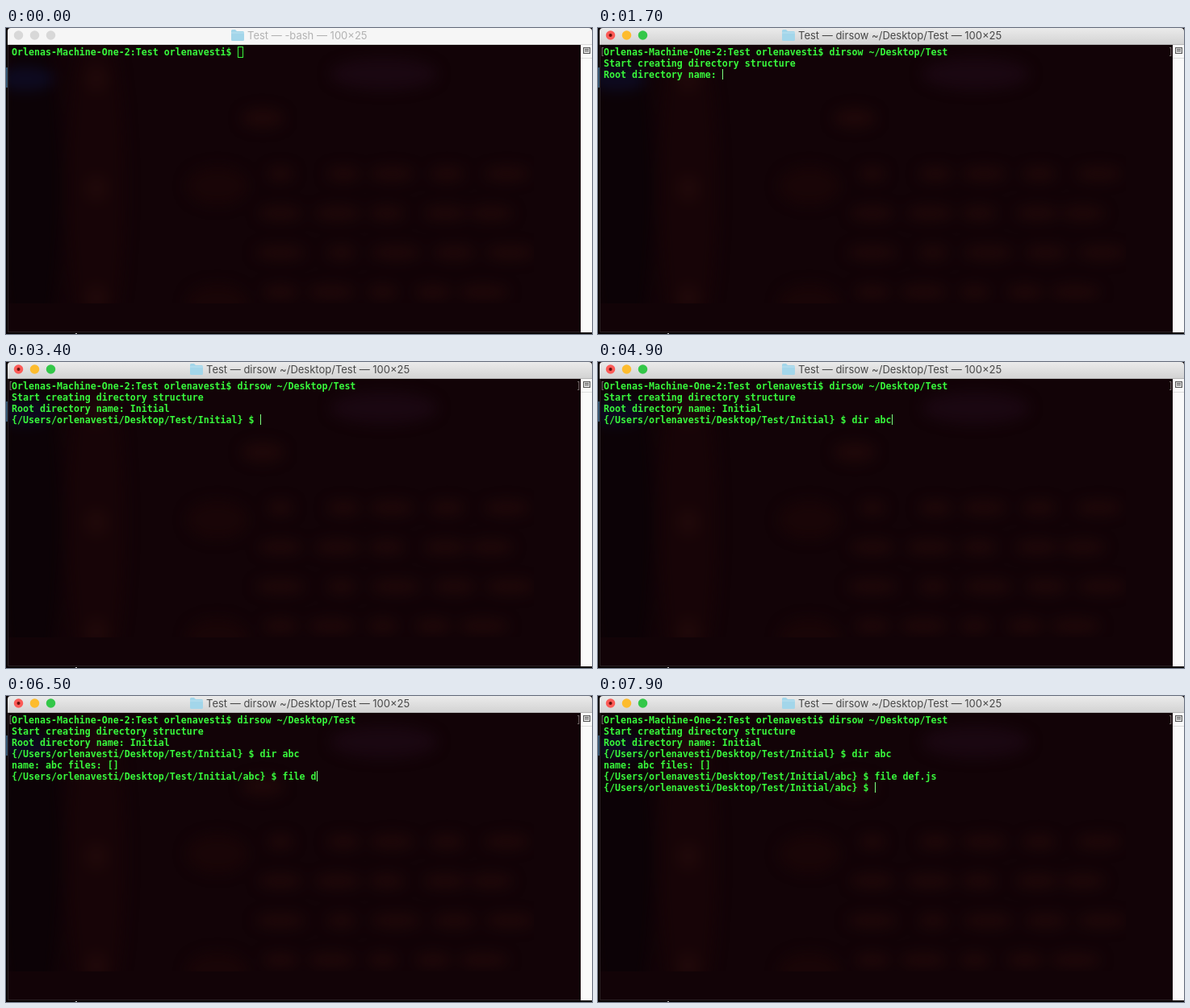
Recreate the animation shown at these times as an HTML page. Size 726 by 380 pixels, loop 8 s.

```html
<!DOCTYPE html>
<html lang="en">
<head>
<meta charset="utf-8">
<title>Terminal</title>
<style>
html, body { margin: 0; width: 100%; height: 100%; overflow: hidden; background: #080103; }
svg { display: block; }
text { white-space: pre; }
#lines { font: bold 11.627px "DejaVu Sans Mono", monospace; fill: #38f83c; }
#title { font: 13px Inter, sans-serif; }
#marks { font: 11.627px "DejaVu Sans Mono", monospace; fill: #7d7474; }
</style>
</head>
<body>
<svg width="726" height="380" viewBox="0 0 726 380">
  <defs>
    <linearGradient id="bar" x2="0" y2="1">
      <stop stop-color="#ebebeb"/><stop offset="1" stop-color="#d2d2d2"/>
    </linearGradient>
    <filter id="soft" filterUnits="userSpaceOnUse" width="726" height="380" color-interpolation-filters="sRGB">
      <feGaussianBlur stdDeviation="8"/>
    </filter>
    <clipPath id="pane"><rect x="2" y="20" width="710" height="357"/></clipPath>
  </defs>

  <rect width="726" height="380" fill="#080103"/>
  <rect y="49" width="2" height="25" fill="#32536f"/>
  <rect x="2" y="20" width="710" height="358" fill="#120307"/>
  <g clip-path="url(#pane)"><g id="glow" filter="url(#soft)"></g></g>
  <path d="M2.5 21V377.5H712" fill="none" stroke="#2c2325"/>
  <rect x="86" y="379" width="2" height="1" fill="#ccc"/>

  <rect x="712" y="20" width="14" height="358" fill="#fafafa"/>
  <path d="M712 37.5h14" stroke="#dedede"/>
  <rect x="715.5" y="24.5" width="8" height="7" fill="#ddd" stroke="#555"/>
  <path d="M717 26.5h5M717 28.5h5" stroke="#555"/>

  <path id="head" d="M2 21V4Q2 0 6 0H722Q726 0 726 4V21z"/>
  <path id="edge" d="M2 20.5H726"/>
  <g id="buttons"></g>
  <circle id="dot" cx="15.5" cy="9" r="2" fill="#65100c"/>
  <g id="folder">
    <path d="M0 1.5Q0 0 1.5 0H5L7 2H14.5Q16 2 16 3.5V12.5Q16 14 14.5 14H1.5Q0 14 0 12.5z"/>
    <path d="M0 4H16" stroke="#fff" stroke-opacity=".3"/>
  </g>
  <text id="title" y="14"></text>

  <g id="marks"><text x="2" y="34">[</text><text x="706" y="34">]</text></g>
  <g id="lines"></g>
  <rect id="cursor" height="13"/>
</svg>

<script>
const $ = id => document.getElementById(id);
const NS = "http://www.w3.org/2000/svg";
const LOOP = 8000, FOCUS = 100, PASTE = 400, RUN = 1200, KEY = 130;
const CELL = 7, LEFT = 7, PITCH = 14;
const GREEN = "#38f83c";

function set(el, attrs) {
  for (const k in attrs) el.setAttribute(k, attrs[k]);
}
function add(parent, tag, attrs) {
  const el = parent.appendChild(document.createElementNS(NS, tag));
  set(el, attrs);
  return el;
}

// Blurred desktop faintly visible through the pane
let seed = 7;
const random = () => (seed = seed * 16807 % 2147483647) / 2147483647;
const glow = (cx, cy, rx, ry, fill = "#1f0809") =>
  add($("glow"), "ellipse", { cx, cy, rx, ry, fill });

glow(30, 200, 38, 220, "#0c0206");
glow(112, 200, 36, 220, "#170407");
glow(24, 63, 36, 15, "#0d0a20");
glow(468, 57, 66, 20, "#1a0711");
glow(318, 112, 26, 12);
for (let i = 0; i < 3; i++) glow(112, 63 + i * 136, 14, 17);
for (let i = 0; i < 2; i++) glow(262, 196 + i * 146, 38, 24, "#190507");
for (let row = 0; row < 4; row++) {
  for (let x = 340; x < 650; x += 55 + random() * 25) {
    glow(x, 181 + row * 49, 16 + random() * 16, 9);
  }
}

// Each line: prompt, time shown, typed text, time of first key, time per key
const home = "{/Users/orlenavesti/Desktop/Test/Initial";
const command = "dirsow ~/Desktop/Test";
const script = [
  ["Orlenas-Machine-One-2:Test orlenavesti$ ", 0, command, PASTE, 0],
  ["Start creating directory structure", RUN],
  ["Root directory name: ", RUN, "Initial", 2000, KEY],
  [home + "} $ ", 3100, "dir abc", 4000, KEY],
  ["name: abc files: []", 5200],
  [home + "/abc} $ ", 5200, "file def.js", 5800, KEY],
  [home + "/abc} $ ", 7500]
];
const rows = script.map((_, i) => add($("lines"), "text", { x: LEFT, y: 34 + i * PITCH }));
const buttons = ["#fc5b57", "#fdbc2e", "#33c748"].map((tint, i) =>
  ({ tint, el: add($("buttons"), "circle", { cx: 15.5 + i * 20, cy: 9, r: 5.75 }) }));

function typed(text = "", start, step, t) {
  if (t < start) return "";
  return step ? text.slice(0, Math.floor((t - start) / step) + 1) : text;
}

function drawBar(t) {
  const active = t >= FOCUS, running = t >= RUN;
  set($("head"), { fill: active ? "url(#bar)" : "#f6f6f6" });
  set($("edge"), { stroke: active ? "#b4b4b4" : "#d8d8d8" });
  for (const { tint, el } of buttons) set(el, { fill: active ? tint : "#d8d8d8" });
  $("dot").style.display = $("marks").style.display = running ? "" : "none";
  set($("folder"), {
    transform: `translate(${running ? 228 : 279} 2)`,
    fill: active && !running ? "#70c9f1" : "#a3d6ea"
  });
  set($("title"), { x: running ? 248 : 299, fill: active ? "#484848" : "#b2b2b2" });
  $("title").textContent = `Test — ${running ? command : "-bash"} — 100×25`;
}

function drawLines(t) {
  let row = 0, length = 0;
  script.forEach(([prompt, shown, text, start, step], i) => {
    const line = t < shown ? "" : prompt + typed(text, start, step, t);
    rows[i].textContent = line;
    if (line) { row = i; length = line.length; }
  });
  const x = LEFT + length * CELL, y = 23 + row * PITCH;
  set($("cursor"), t < FOCUS
    ? { x: x + .5, y: y + .5, width: 6, fill: "none", stroke: GREEN }
    : { x, y, width: 1, fill: "#7dff80", stroke: "none" });
}

function frame(now) {
  const t = now % LOOP;
  drawBar(t);
  drawLines(t);
  requestAnimationFrame(frame);
}
frame(0);
</script>
</body>
</html>
```
